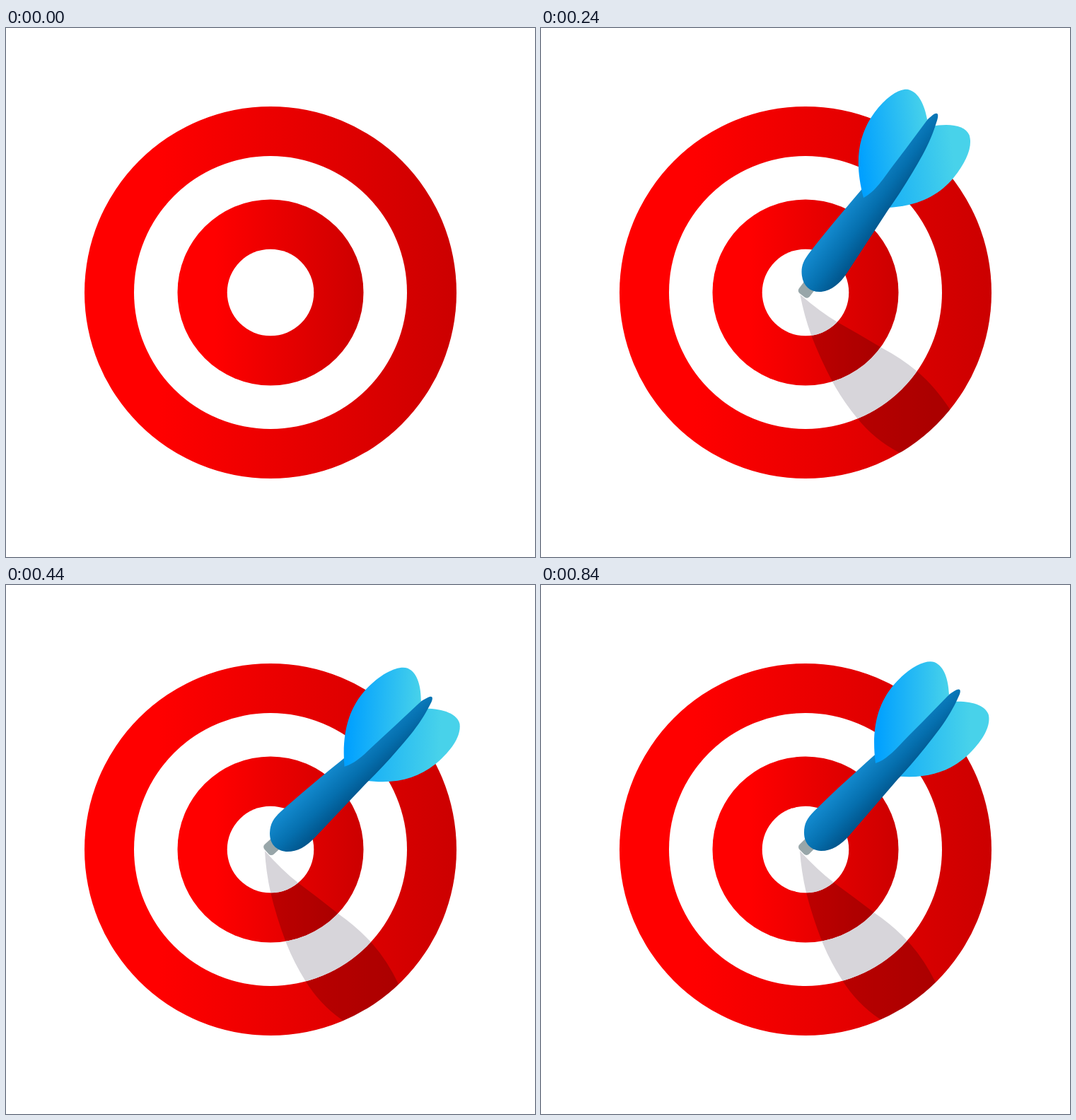
Animation, 748 px wide and 748 px high, one loop 2.4 s. Source, as an HTML page:

```html
<!DOCTYPE html>
<html lang="en">
<head>
<meta charset="utf-8">
<title>Bullseye</title>
<style>
  html, body { margin: 0; width: 100%; height: 100%; overflow: hidden; background: #fff; }
  svg { display: block; width: 100vw; height: 100vh; }
</style>
</head>
<body>
<svg viewBox="0 0 748 748">
  <defs>
    <linearGradient id="red">
      <stop offset=".2" stop-color="#f00"/>
      <stop offset="1" stop-color="#c00"/>
    </linearGradient>
    <linearGradient id="finLeft">
      <stop offset=".03" stop-color="#00a0ff"/>
      <stop offset="1" stop-color="#48d2ea"/>
    </linearGradient>
    <linearGradient id="finRight">
      <stop offset="0" stop-color="#16aff7"/>
      <stop offset=".8" stop-color="#48d2ea"/>
    </linearGradient>
    <linearGradient id="blue" gradientUnits="userSpaceOnUse" x1="384" y1="328" x2="427" y2="370">
      <stop offset="0" stop-color="#1288cc"/>
      <stop offset=".5" stop-color="#056fae"/>
      <stop offset="1" stop-color="#004f84"/>
    </linearGradient>
    <clipPath id="redArea"><path clip-rule="evenodd"/></clipPath>
    <clipPath id="whiteArea"><path clip-rule="evenodd"/></clipPath>
    <path id="shade" d="M366 376Q392 404 413 420Q442 441 472 464Q497 481 517 502Q540 526 558 562L570 590L500 633L478 613Q447 592 426 559Q408 531 397 503Q384 470 375 435Q368 405 366 376Z"/>
  </defs>

  <g id="rings"></g>

  <g id="shadow">
    <g clip-path="url(#redArea)"><use class="cast" href="#shade" fill="#000" fill-opacity=".2"/></g>
    <g clip-path="url(#whiteArea)"><use class="cast" href="#shade" fill="#d7d5da"/></g>
  </g>

  <g id="dart">
    <rect y="-9.5" width="30" height="19" rx="5" fill="#98a6a9" transform="translate(368.7 377.3) rotate(-45)"/>
    <path fill="url(#finRight)" d="M500 270C545 275 578 264 603 241C625 220 636 200 633 184C629 170 608 163 580 165Z"/>
    <path fill="url(#blue)" d="M592 148C594 150 592 155 589 161C583 174 575 188 564 203C546 227 525 253 505 274L436 354C424 368 411 376 396 376C381 375 372 365 372 350C372 338 376 330 386 320C412 294 440 269 471 241L560 168C572 158 582 151 588 148Q591 147 592 148Z"/>
    <path fill="url(#finLeft)" d="M473 252C467 205 475 170 498 142C520 116 544 105 556 109C571 115 576 135 577 155L540 193L520 213C505 228 491 246 473 252Z"/>
  </g>
</svg>
<script>
  const LOOP = 2400, STEP = 40, START = 120, HIT = 240;
  const CENTRE = 374;
  const RADII = [263, 193, 131.5, 61.3];
  // [time in ms, angle in degrees]
  const DART_SWING = [[200, 0], [280, -15.3], [380, 12.6], [480, -2.6], [840, 0]];
  const SHADOW_SWING = [[200, 0], [280, -13.2], [380, 4], [480, -0.85], [840, 0]];

  const $ = id => document.getElementById(id);
  const dart = $('dart'), shadow = $('shadow');
  const casts = document.querySelectorAll('.cast');

  const disc = r => `M${CENTRE - r} ${CENTRE}a${r} ${r} 0 1 0 ${2 * r} 0a${r} ${r} 0 1 0 ${-2 * r} 0Z`;

  $('rings').innerHTML = RADII.map((r, i) =>
    `<circle cx="${CENTRE}" cy="${CENTRE}" r="${r}" fill="${i % 2 ? '#fff' : 'url(#red)'}"/>`).join('');
  $('redArea').firstChild.setAttribute('d', RADII.map(disc).join(''));
  $('whiteArea').firstChild.setAttribute('d', RADII.slice(1).map(disc).join(''));

  function swing(keys, t) {
    if (t <= keys[0][0]) return keys[0][1];
    for (let i = 1; i < keys.length; i++) {
      const [t0, a0] = keys[i - 1], [t1, a1] = keys[i];
      if (t <= t1) {
        const p = (t - t0) / (t1 - t0);
        return a0 + (a1 - a0) * (1 - Math.cos(Math.PI * p)) / 2;
      }
    }
    return keys[keys.length - 1][1];
  }

  const turn = angle => `rotate(${angle} 374 373)`;

  function draw(t) {
    dart.style.display = t < START ? 'none' : '';
    shadow.style.display = t < HIT ? 'none' : '';
    const p = Math.min(1, Math.max(0, (t - START) / (HIT - START)));
    const far = 1 - p ** 1.5;
    dart.setAttribute('transform',
      `translate(${364 * far} ${-359 * far}) ${turn(swing(DART_SWING, t))}`);
    const cast = turn(swing(SHADOW_SWING, t));
    casts.forEach(c => c.setAttribute('transform', cast));
  }

  const begin = performance.now();
  function tick() {
    const t = (performance.now() - begin) % LOOP;
    draw(Math.floor(t / STEP) * STEP);
    requestAnimationFrame(tick);
  }
  tick();
</script>
</body>
</html>
```
